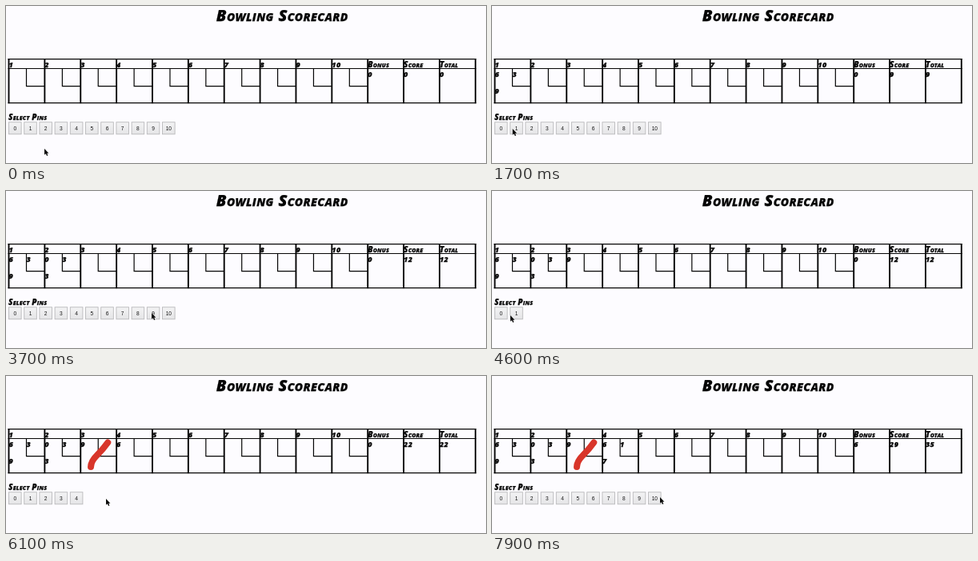
An HTML page that plays this animation: 600x197 px, repeating every 8000 ms.

```html
<!DOCTYPE html>
<html lang="en">
<head>
<meta charset="utf-8">
<title>Bowling Scorecard</title>
<style>
  html, body { margin: 0; width: 100%; height: 100%; overflow: hidden; background: #fdfcff; }
  svg { display: block; width: 600px; height: 197px; }
  .ink {
    font: italic 800 10px "Open Sans", "Noto Sans", sans-serif;
    font-variant-caps: small-caps; letter-spacing: .02em;
    fill: #050505; stroke: #050505; stroke-width: .25;
  }
  .title { font-size: 20px; }
  .num { font-size: 9px; letter-spacing: .05em; }
  .grid { fill: none; stroke: #050505; }
  .pin rect { fill: url(#face); stroke: #b9b9bb; stroke-width: .9; }
  .pin text { font: 6.6px "Liberation Sans", Arial, sans-serif; fill: #181818; text-anchor: middle; }
</style>
</head>
<body>
<svg viewBox="0 0 600 197">
  <defs>
    <linearGradient id="face" x2="0" y2="1">
      <stop offset="0" stop-color="#f3f3f4"/>
      <stop offset="1" stop-color="#e5e5e7"/>
    </linearGradient>
  </defs>
  <text class="ink title" x="345.3" y="18.5" text-anchor="middle">Bowling Scorecard</text>
  <g id="table"></g>
  <g id="marks"></g>
  <text class="ink" x="3" y="143">Select Pins</text>
  <g id="pins"></g>
  <path id="cursor" d="M0 0V7.800L1.800 6.200L3 9L4.400 8.400L3.200 5.700H5.400Z" fill="#0b0b0b" stroke="#fff" stroke-width=".6" paint-order="stroke"/>
</svg>
<script>
const NS = "http://www.w3.org/2000/svg";
const LOOP = 8000, STEP = 100, TRAVEL = 300;
const LEFT = 3.5, COL = 44.87, HALF = 22, PIN_GAP = 19.2;
const TOP = 89.3, SUM = 110.3;
const $ = id => document.getElementById(id);

function add(parent, tag, attrs, text) {
  const el = document.createElementNS(NS, tag);
  for (const key in attrs) el.setAttribute(key, attrs[key]);
  if (text !== undefined) el.textContent = text;
  return parent.appendChild(el);
}

const colX = i => LEFT + i * COL;
const write = (parent, x, y, text) =>
  add(parent, "text", { class: isNaN(text) ? "ink" : "ink num", x, y }, text);

// Score table
const heads = [...Array.from({ length: 10 }, (_, i) => i + 1), "Bonus", "Score", "Total"];
const rows = [66.6, 78.5, 121.6].map(y => `M${LEFT - 1} ${y}H${colX(heads.length) + 1}`).join("");
let cols = "", boxes = "";
for (let i = 0; i <= heads.length; i++) {
  cols += `M${colX(i)} 66V122.200`;
  if (i < 10) boxes += `M${colX(i) + HALF} 78.500V100.700H${colX(i + 1)}`;
}
add($("table"), "path", { class: "grid", d: rows + boxes, "stroke-width": 1.2 });
add($("table"), "path", { class: "grid", d: cols, "stroke-width": 1.9 });
heads.forEach((head, i) => write($("table"), colX(i), 77.2, head));

const pins = Array.from({ length: 11 }, (_, i) => {
  const g = add($("pins"), "g", { class: "pin", transform: `translate(${LEFT + i * PIN_GAP} 145.800)` });
  add(g, "rect", { width: 15.6, height: 15 });
  add(g, "text", { x: 7.8, y: 9.9 }, i);
  return g;
});

// Where the pointer comes to rest, and when it clicks there
const stops = [
  { at: 0, x: 48, y: 179 },
  { at: 100, x: 44, y: 158 },
  { at: 700, x: 125, y: 151, click: 800 },
  { at: 1400, x: 63, y: 154, click: 1600 },
  { at: 1900, x: 10, y: 154, click: 2300 },
  { at: 2800, x: 63, y: 153, click: 3100 },
  { at: 3700, x: 182, y: 153, click: 4000 },
  { at: 4600, x: 23, y: 156, click: 4900 },
  { at: 5500, x: 186, y: 153 },
  { at: 6000, x: 125, y: 154, click: 6100 },
  { at: 6800, x: 33, y: 158, click: 7300 },
  { at: 7900, x: 210, y: 152 }
];

function pointAt(t) {
  const next = stops.findIndex(s => s.at > t);
  if (next < 0) return stops[stops.length - 1];
  const a = stops[next - 1], b = stops[next];
  const span = Math.min(TRAVEL, b.at - a.at);
  const k = Math.max(0, 1 - (b.at - t) / span);
  const ease = 1 - (1 - k) ** 3;
  return { x: a.x + (b.x - a.x) * ease, y: a.y + (b.y - a.y) * ease };
}

// The button under a click gives the number of pins knocked down
const rollsAt = t => stops.filter(s => s.click <= t).map(s => Math.floor((s.x - LEFT) / PIN_GAP));

function drawSpare(col) {
  add($("marks"), "path", {
    transform: `translate(${colX(col)} 79)`,
    d: "M34 4.500Q28 13 20 21Q13 28 12.800 35",
    fill: "none", stroke: "#d8352a", "stroke-width": 8, "stroke-linecap": "round"
  });
}

function drawScores(rolls) {
  const marks = $("marks");
  let score = 0, bonus = 0, afterSpare = false;
  marks.replaceChildren();
  for (let i = 0; i < rolls.length; i += 2) {
    const col = i / 2, [first, second] = rolls.slice(i, i + 2);
    write(marks, colX(col), TOP, first);
    if (second === undefined) break;
    const sum = first + second;
    score += sum;
    if (afterSpare) bonus += first;
    afterSpare = sum === 10;
    if (afterSpare) {
      drawSpare(col);
    } else {
      write(marks, colX(col) + HALF, TOP, second);
      write(marks, colX(col), SUM, sum);
    }
  }
  [bonus, score, score + bonus].forEach((n, i) => write(marks, colX(10 + i), TOP, n));
}

function draw(t) {
  const rolls = rollsAt(t);
  const open = rolls.length % 2 ? 11 - rolls[rolls.length - 1] : 11;
  const { x, y } = pointAt(t);
  drawScores(rolls);
  pins.forEach((pin, i) => { pin.style.display = i < open ? "" : "none"; });
  $("cursor").setAttribute("transform", `translate(${x} ${y})`);
}

const start = performance.now();
let last = -1;
function tick() {
  const t = Math.floor((performance.now() - start) % LOOP / STEP) * STEP;
  if (t !== last) draw(last = t);
  requestAnimationFrame(tick);
}
tick();
</script>
</body>
</html>
```
